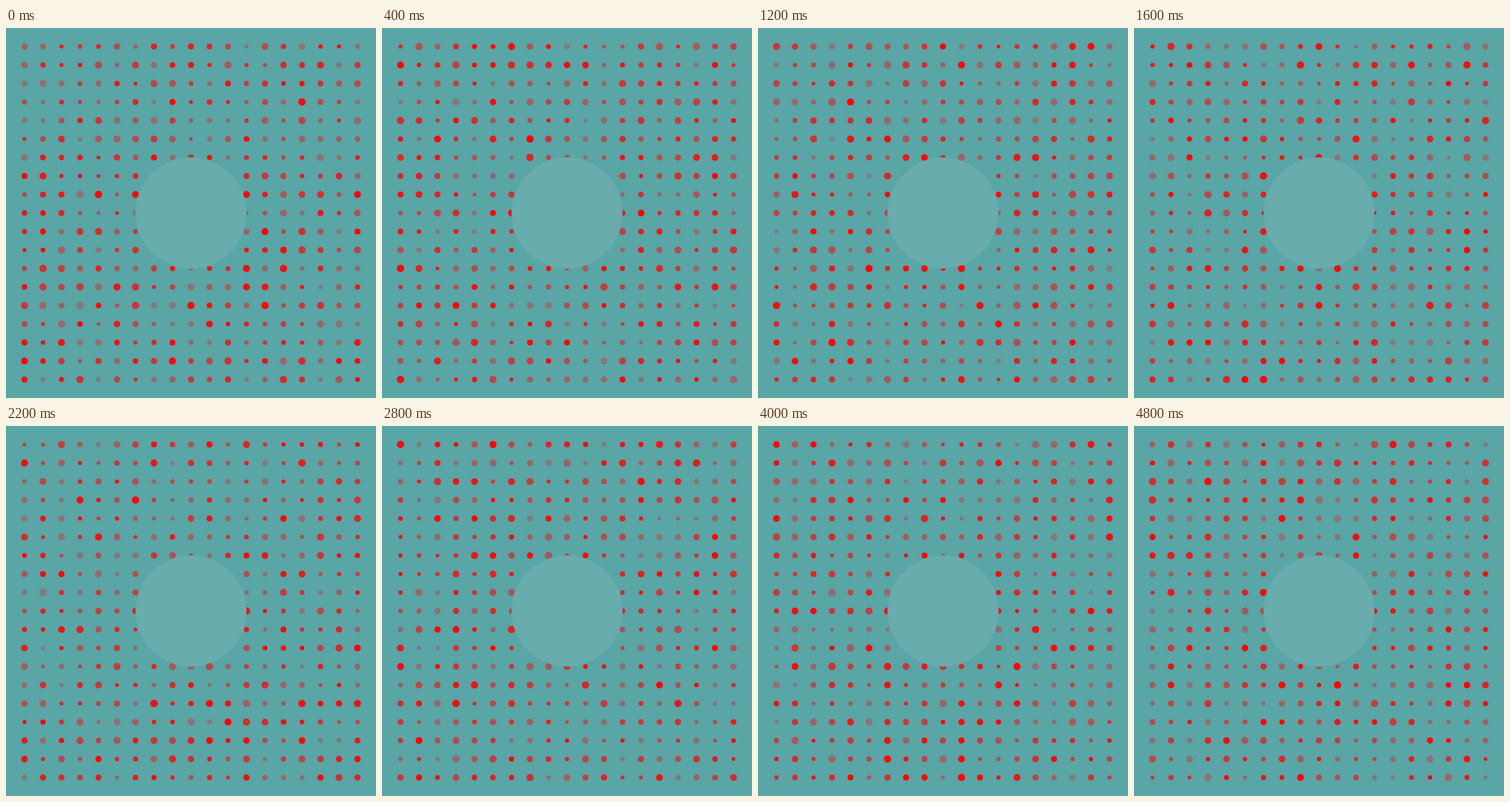
Recreate the animation shown at these times as an HTML page. Size 500 px wide and 500 px high, loop 5 s.

```html
<!DOCTYPE html>
<html lang="en">
<head>
<meta charset="utf-8">
<title>Flickering dots</title>
<style>
  html, body { margin: 0; width: 100%; height: 100%; overflow: hidden; background: #5aa5a6; }
  svg { display: block; width: 100vw; height: 100vh; }
</style>
</head>
<body>
<svg viewBox="0 0 500 500">
  <rect width="500" height="500" fill="#5aa5a6"/>
  <g id="dots" fill="#ff0000"></g>
  <circle cx="250" cy="250" r="75" fill="#68acad"/>
</svg>
<script>
  const STEP = 200, LOOP = 5000, GAP = 25, COUNT = 19;
  const group = document.getElementById('dots');
  const dots = [];

  for (let row = 1; row <= COUNT; row++) {
    for (let col = 1; col <= COUNT; col++) {
      const dot = document.createElementNS('http://www.w3.org/2000/svg', 'circle');
      dot.setAttribute('cx', col * GAP);
      dot.setAttribute('cy', row * GAP);
      group.appendChild(dot);
      dots.push(dot);
    }
  }

  function seeded(seed) {
    let s = seed >>> 0;
    return () => {
      s = (s + 0x6d2b79f5) >>> 0;
      let v = Math.imul(s ^ (s >>> 15), s | 1);
      v ^= v + Math.imul(v ^ (v >>> 7), v | 61);
      return ((v ^ (v >>> 14)) >>> 0) / 4294967296;
    };
  }

  // Every step gives each dot a fresh size and opacity.
  function draw(step) {
    const random = seeded(step * 7919 + 17);
    for (const dot of dots) {
      dot.setAttribute('r', (2.5 + 2.5 * random()).toFixed(2));
      dot.setAttribute('fill-opacity', (0.27 + 0.73 * random()).toFixed(3));
    }
  }

  const start = performance.now();
  let shown = -1;

  function tick() {
    const time = (performance.now() - start) % LOOP;
    const step = Math.floor(time / STEP);
    if (step !== shown) draw(shown = step);
    requestAnimationFrame(tick);
  }
  tick();
</script>
</body>
</html>
```
